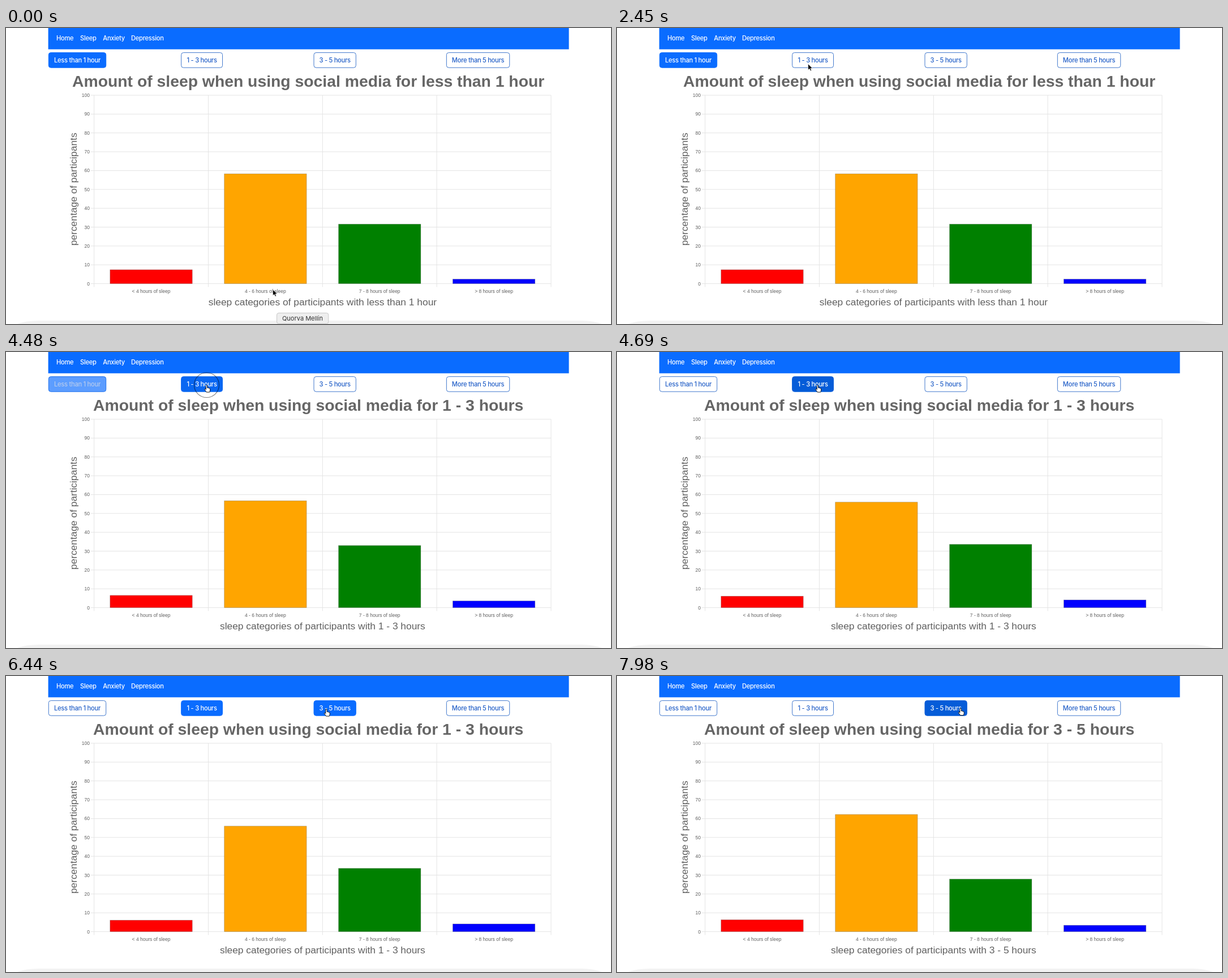
Recreate the animation shown at these times as an HTML page. Size 1069 px wide and 524 px high, loop 8000 ms.

```html
<!DOCTYPE html>
<html lang="en">
<head>
<meta charset="utf-8">
<title>Sleep chart</title>
<style>
  html, body { margin: 0; width: 100%; height: 100%; overflow: hidden; background: #fff; }
  svg { display: block; width: 1069px; height: 524px; }
  .ui { font: 500 11.15px Inter, Roboto, sans-serif; letter-spacing: -.28px; }
  .tip { font: 11px Inter, Roboto, sans-serif; }
  .chart { font: 8.5px "Liberation Sans", Arial, sans-serif; fill: #606060; }
  .chart .title { font-size: 28.33px; font-weight: bold; fill: #666; }
  .chart .axis { font-size: 17.38px; }
  .mid { text-anchor: middle; }
  .end { text-anchor: end; }
</style>
</head>
<body>
<svg id="stage" viewBox="0 0 1069 524"></svg>
<script>
const LOOP = 8000, STEP = 70, FADE = 210, GROW = 280, RING = 140;
const BLUE = [10, 108, 255], DARK = [5, 92, 216], WHITE = [255, 255, 255];
const EDGE = [66, 121, 205], INK = [37, 97, 200];
const stage = document.getElementById('stage');

function add(tag, attrs, text, parent = stage) {
  const el = document.createElementNS('http://www.w3.org/2000/svg', tag);
  set(el, attrs);
  if (text) el.textContent = text;
  parent.append(el);
  return el;
}
function set(el, attrs) { for (const key in attrs) el.setAttribute(key, attrs[key]); }
const show = (el, on) => set(el, { visibility: on ? 'visible' : 'hidden' });
const clamp = p => Math.min(Math.max(p, 0), 1);
const mix = (a, b, p) => a + (b - a) * p;
const mixColor = (a, b, p) => `rgb(${a.map((v, i) => Math.round(mix(v, b[i], p)))})`;
const easeOut = (p, power) => 1 - (1 - clamp(p)) ** power;
// Fades in at the start of a span and out at its end.
const within = (t, [from, to]) => clamp((t - from) / FADE) - clamp((t - to) / FADE);

// Each option is a button with the chart it selects.
const NEVER = [Infinity, Infinity];
const options = [
  { text: 'Less than 1 hour', width: 102.4, picked: -LOOP, hover: NEVER, values: [7.4, 58.3, 31.6, 2.4] },
  { text: '1 - 3 hours', width: 73.9, picked: 4410, hover: [3605, 5180], values: [6.1, 56, 33.6, 4.1] },
  { text: '3 - 5 hours', width: 75.3, picked: 6860, hover: [5950, Infinity], values: [6.3, 62.2, 27.9, 3.4] },
  { text: 'More than 5 hours', width: 112.4, picked: Infinity, hover: NEVER },
];

// Navigation and buttons
add('rect', { x: 74.6, width: 920, height: 37.7, fill: `rgb(${BLUE})` });
[['Home', 89], ['Sleep', 131], ['Anxiety', 171.3], ['Depression', 221]].forEach(([name, x]) =>
  add('text', { x, y: 22, class: 'ui', fill: '#fff' }, name));

options.forEach((option, i) => {
  const x = 74.8 + i * 234.35, width = option.width;
  option.box = add('rect', { x: x + .5, y: 43.6, width: width - 1, height: 26.6, rx: 4 });
  option.label = add('text', { x: x + width / 2, y: 61, class: 'ui mid' }, option.text);
});
function paintButton(option, i, t) {
  const next = options[i + 1];
  const picked = within(t, [option.picked, next ? next.picked : Infinity]);
  const hover = within(t, option.hover);
  const fill = Math.max(picked, hover), dark = Math.min(picked, hover);
  const full = dark ? mixColor(BLUE, DARK, dark) : null;
  set(option.box, {
    fill: full || mixColor(WHITE, BLUE, fill),
    stroke: full || mixColor(EDGE, BLUE, fill),
  });
  set(option.label, { fill: mixColor(INK, WHITE, fill) });
}

// Chart
const LEFT = 155.6, COLUMN = 201.85, BASE = 452.6, UNIT = 3.336, BAR = .72 * COLUMN;
const chart = add('g', { class: 'chart' });
const title = add('text', { x: 534.2, y: 103.6, class: 'title mid' }, '', chart);
const line = d => add('path', { d, stroke: '#e4e4e4' }, '', chart);
for (let v = 0; v <= 100; v += 10) {
  const y = BASE - v * UNIT;
  line(`M150 ${y}H${LEFT + 4 * COLUMN}`);
  add('text', { x: 148, y: y + 3, class: 'end' }, String(v), chart);
}
for (let i = 0; i <= 4; i++) line(`M${LEFT + i * COLUMN} 119V458.5`);

const groups = { '< 4': 'red', '4 - 6': 'orange', '7 - 8': 'green', '> 8': 'blue' };
const bars = Object.entries(groups).map(([range, fill], i) => {
  const center = LEFT + (i + .5) * COLUMN;
  add('text', { x: center, y: 468.6, class: 'mid' }, range + ' hours of sleep', chart);
  return add('rect', {
    x: center - BAR / 2, width: BAR, fill,
    stroke: '#666', 'stroke-width': .7, 'stroke-opacity': .5,
  }, '', chart);
});
const xTitle = add('text', { x: 559.4, y: 491.3, class: 'axis mid' }, '', chart);
add('text', { transform: 'translate(125 285.3) rotate(-90)', class: 'axis mid' },
  'percentage of participants', chart);

function paintChart(t) {
  const n = options.findLastIndex(option => t > option.picked);
  const { text, picked, values } = options[n];
  const before = n ? options[n - 1].values : values;
  const p = easeOut((t - picked) / GROW, 4);
  const usage = text.toLowerCase();
  title.textContent = 'Amount of sleep when using social media for ' + usage;
  xTitle.textContent = 'sleep categories of participants with ' + usage;
  bars.forEach((bar, i) => {
    const height = mix(before[i], values[i], p) * UNIT;
    set(bar, { y: BASE - height, height });
  });
}

// Dock edge and its label
add('path', { d: 'M20 524Q34 518 60 518H1013Q1039 518 1053 524Z', fill: '#f2f2f2' });
const tip = add('g');
add('rect', { x: 478.5, y: 504.5, width: 91.3, height: 19, rx: 3.5, fill: '#eee', stroke: '#c9c9c9' }, '', tip);
add('text', { x: 524, y: 518, class: 'tip mid', fill: '#333' }, 'Quorva Mellin', tip);

// Pointer
const ring = add('circle', { r: 22, fill: 'none', stroke: '#000', 'stroke-width': 1.2, opacity: .5 });
const arrow = add('path', {
  d: 'M0 0V10.8L2.5 8.5L4.2 12.3L6 11.5L4.4 7.8H7.8Z',
  fill: '#000', stroke: '#fff', 'stroke-width': .7,
});
const hand = add('path', {
  d: 'M-1.2 1.2Q-1.2 0 0 0T1.2 1.2V5Q2.6 4.2 3.2 5.4Q4.4 4.8 4.9 6Q6.2 5.7 6.2 7.4V9.5Q5.8 11 5.2 12.6H-.4Q-1 11.2 -3.4 8.4Q-4 7 -2.9 6.8Q-2 6.8 -1.2 8Z',
  fill: '#fff', stroke: '#000', 'stroke-width': .9, 'stroke-linejoin': 'round',
});
const start = { x: 471.5, y: 463 };
const moves = [
  { from: 0, to: 210, x: 375.5, y: 300 },
  { from: 420, to: 630, x: 267.5, y: 170 },
  { from: 840, to: 1050, x: 227.5, y: 89.5 },
  { from: 1470, to: 2240, x: 322.5, y: 69 },
  { from: 2240, to: 2730, x: 345, y: 61 },
  { from: 3570, to: 3850, x: 354.5, y: 58.5 },
  { from: 5040, to: 5880, x: 537, y: 58 },
  { from: 5880, to: 6440, x: 566, y: 58.5 },
  { from: 7560, to: 7980, x: 607, y: 57 },
];
const presses = [3150, 4410, 6790];

function pointerAt(t) {
  return moves.reduce((at, move) => {
    const p = easeOut((t - move.from) / (move.to - move.from), 2);
    return { x: mix(at.x, move.x, p), y: mix(at.y, move.y, p) };
  }, start);
}
function paintPointer(t) {
  const { x, y } = pointerAt(t);
  const over = options.some(({ hover: [from, to] }) => t >= from && t < to);
  for (const el of [arrow, hand, ring]) set(el, { transform: `translate(${x} ${y})` });
  show(arrow, !over);
  show(hand, over);
  show(ring, presses.some(at => t >= at && t < at + RING));
}

function paint(now) {
  const t = Math.floor((now % LOOP) / STEP) * STEP;
  options.forEach((option, i) => paintButton(option, i, t));
  paintChart(t);
  paintPointer(t);
  show(tip, t < STEP);
}
function tick() {
  paint(performance.now());
  requestAnimationFrame(tick);
}
paint(0);
requestAnimationFrame(tick);
</script>
</body>
</html>
```
